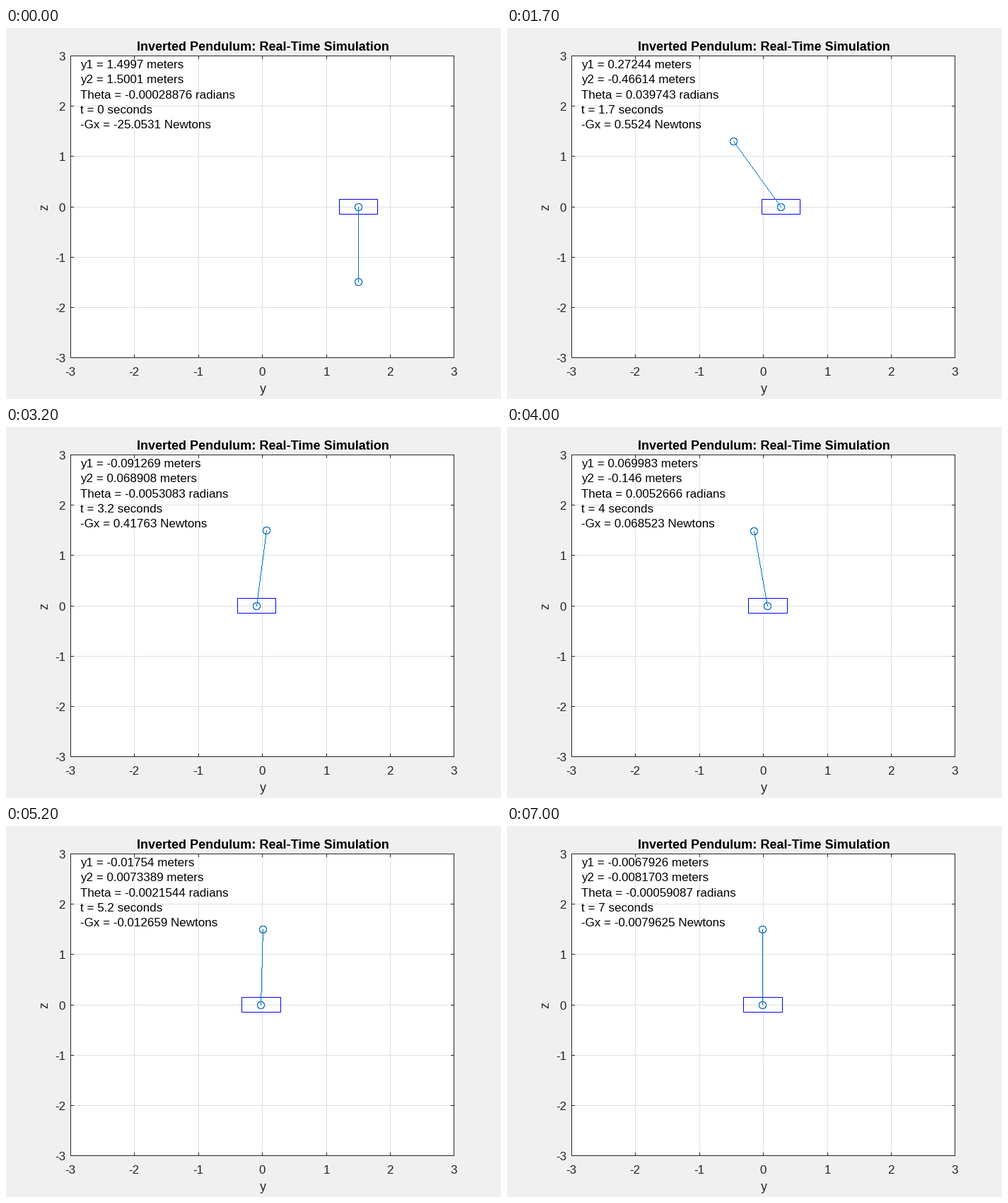
Recreate the animation shown at these times as a matplotlib script. Size 700 by 525 pixels, loop 7100 ms.

```python
import math
import numpy as np
import matplotlib.pyplot as plt
from matplotlib.animation import FuncAnimation
from matplotlib.collections import PolyCollection

W, H, DPI = 700, 525, 100
FRAMES, STEP = 71, 100
ROD = 1.5
PX = 72 / DPI  # one pixel in points
GREY, GRID, BLUE, ROD_BLUE = "#262626", "#dfdfdf", "#0000ff", "#0072bd"

plt.rcParams["font.family"] = "Liberation Sans"


# Motion: damped waves. The rod angle is measured from upright.

def cart_at(t):
    return 1.4997 * math.exp(-0.76 * t) * math.cos(3.197 * t)


def angle_at(t):
    s = t * (1 - math.exp(-4 * t))  # starts from rest
    decay = math.exp(-0.59 * s - 0.042 * s * s)
    return (math.pi - 0.00028876) * decay * math.cos(2.6 * s - 0.08 * s * s)


def theta_at(t):
    return -0.00028876 - 0.17 * math.exp(-0.85 * t) * math.sin(2.8 * t)


def force_at(t):
    return -25.0531 * math.exp(-1.15 * t) * math.cos(2.68 * t)


def px(y):
    return math.floor(362.53 + 90.48 * y) + 0.5


def pz(z):
    return math.floor(253.0 - 71.2 * z) + 0.5


def num(v):
    """Five significant digits, or four decimals for larger values."""
    digits = max(5, math.floor(math.log10(abs(v))) + 5) if v else 5
    return f"{v:.{digits}g}"


fig = plt.figure(figsize=(W / DPI, H / DPI), dpi=DPI, facecolor="#f0f0f0")
ax = fig.add_axes([0, 0, 1, 1])
ax.set_xlim(0, W)
ax.set_ylim(H, 0)
ax.axis("off")


def line(xs, ys, color, z=2):
    return ax.plot(xs, ys, color=color, lw=PX, snap=False, zorder=z,
                   solid_capstyle="projecting", solid_joinstyle="miter")[0]


def label(x, y, s, size=17, color=GREY, ha="center", **kw):
    return ax.text(x, y, s, fontsize=size * PX, color=color, ha=ha,
                   va="baseline", zorder=6, **kw)


def cells(points):
    """Unit squares around the pixels that hold the points."""
    corners = np.array([(0, 0), (1, 0), (1, 1), (0, 1)])
    pixels = np.unique(np.floor(points), axis=0)
    return pixels[:, None, :] + corners


def segment(a, b):
    steps = int(max(abs(a[0] - b[0]), abs(a[1] - b[1]))) + 1
    return np.linspace(a, b, steps)


turn = np.linspace(0, 2 * math.pi, 120, endpoint=False)
RING = 5 * np.column_stack([np.cos(turn), np.sin(turn)])

left, right, top, bottom = px(-3), px(3), pz(3), pz(-3)
box = ([left, right, right, left, left], [top, top, bottom, bottom, top])
ax.fill(*box, color="white", lw=0, zorder=0)

for v in range(-3, 4):
    x, y = px(v), pz(v)
    if abs(v) < 3:
        line([x, x], [top, bottom], GRID, 1)
        line([left, right], [y, y], GRID, 1)
    for edge, inward in ((top, 4), (bottom, -4)):
        line([x, x], [edge, edge + inward], GREY)
    for edge, inward in ((left, 4), (right, -4)):
        line([edge, edge + inward], [y, y], GREY)
    label(x - 0.5, 492, str(v))
    label(84, y + 6.5, str(v), ha="right")
line(*box, GREY)

label(363, 32, "Inverted Pendulum: Real-Time Simulation", 18, "black",
      weight="bold")
label(363.3, 516, "y", 18)
label(59, 253, "z", 18, rotation=90, rotation_mode="anchor")

rows = [label(105, 57 + 21.35 * i, "", color="black", ha="left")
        for i in range(5)]
cart = line([], [], BLUE, 3)
pendulum = PolyCollection([], facecolors=ROD_BLUE, linewidths=0, zorder=5)
pendulum.set_snap(False)
ax.add_collection(pendulum, autolim=False)


def draw(i):
    t = i / 10
    y1, phi = cart_at(t), angle_at(t)
    y2, z2 = y1 + ROD * math.sin(phi), ROD * math.cos(phi)

    a, b, hi, lo = px(y1 - 0.3), px(y1 + 0.3), pz(0.15), pz(-0.15)
    cart.set_data([a, b, b, a, a], [hi, hi, lo, lo, hi])

    pivot, bob = np.array([px(y1), pz(0)]), np.array([px(y2), pz(z2)])
    pendulum.set_verts(cells(np.vstack(
        [segment(pivot, bob), pivot + RING, bob + RING])))

    texts = (f"y1 = {num(y1)} meters", f"y2 = {num(y2)} meters",
             f"Theta = {num(theta_at(t))} radians", f"t = {t:g} seconds",
             f"-Gx = {num(force_at(t))} Newtons")
    for row, s in zip(rows, texts):
        row.set_text(s)
    return [cart, pendulum, *rows]


anim = FuncAnimation(fig, draw, frames=FRAMES, interval=STEP,
                     init_func=lambda: draw(0), repeat=True, repeat_delay=0)
plt.show()
```
